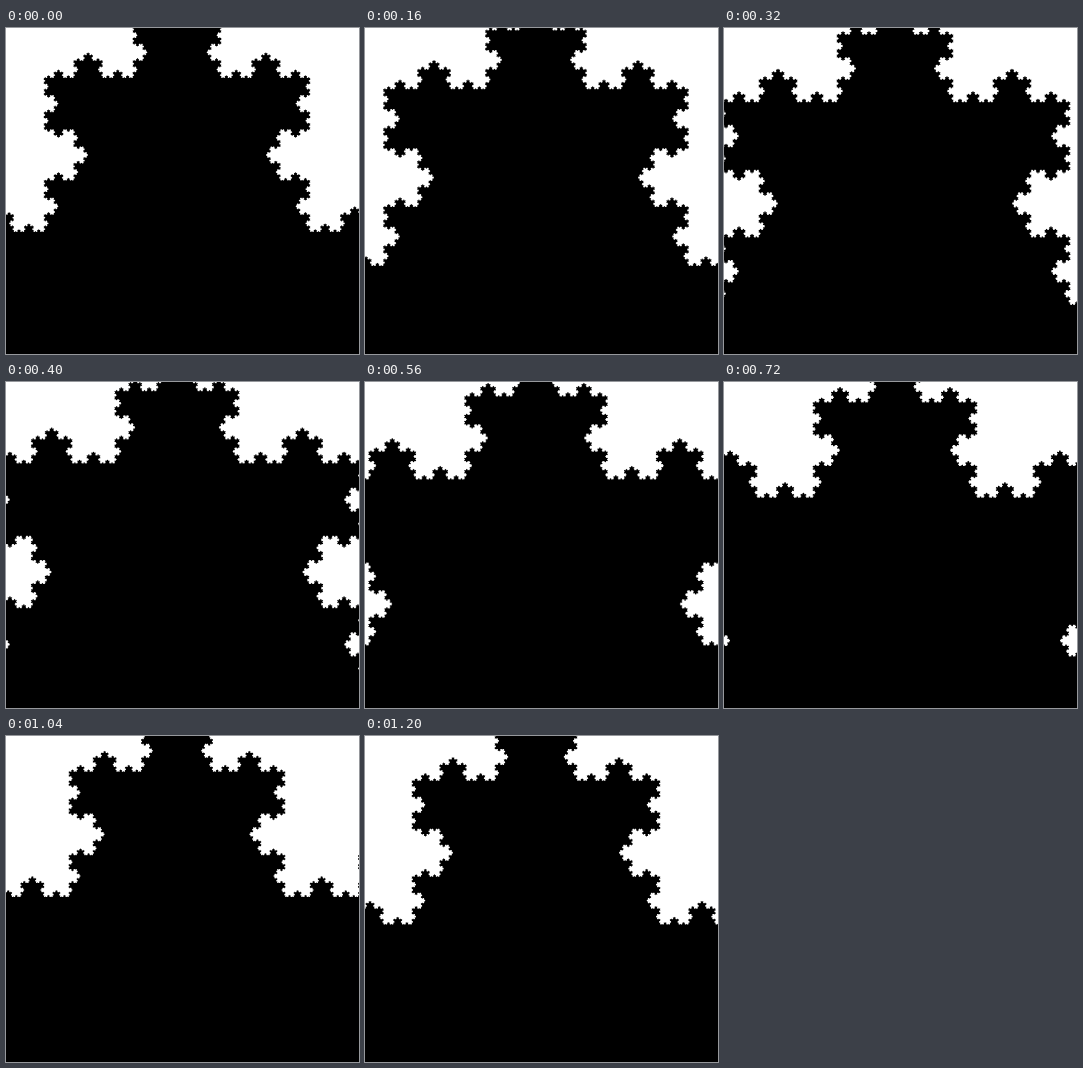
An HTML page with a canvas that plays this animation: 353x326 px, repeating every 1280 ms.

```html
<!DOCTYPE html>
<html>
<head>
<meta charset="utf-8">
<title>Koch curve zoom</title>
<style>
html, body { margin: 0; width: 100%; height: 100%; overflow: hidden; background: #fff; }
canvas { display: block; }
</style>
</head>
<body>
<canvas id="stage" width="353" height="326"></canvas>
<script>
const ctx = document.getElementById('stage').getContext('2d');
const STEPS = 16, STEP_MS = 80;
const TIP = { x: 171, y: -27 };   // fixed point of the zoom
const SIDE = 800, DEPTH = 7;

// Two Koch sides meeting in the tip at (0, 0), drawn turtle-style.
function snowflakeTip() {
  const path = new Path2D();
  const unit = SIDE / 3 ** DEPTH;
  let x = -SIDE / 2, y = SIDE * Math.sqrt(3) / 2;
  let dir = -1;                   // in units of 60 degrees

  function koch(depth) {
    if (depth === 0) {
      x += unit * Math.cos(dir * Math.PI / 3);
      y += unit * Math.sin(dir * Math.PI / 3);
      path.lineTo(x, y);
      return;
    }
    for (const turn of [-1, 2, -1, 0]) {
      koch(depth - 1);
      dir += turn;
    }
  }

  path.moveTo(x, y);
  koch(DEPTH);
  dir += 2;
  koch(DEPTH);
  path.closePath();
  return path;
}

const tip = snowflakeTip();
let shown = -1;

function draw(step) {
  const zoom = 3 ** (step / STEPS);
  ctx.setTransform(1, 0, 0, 1, 0, 0);
  ctx.fillStyle = '#fff';
  ctx.fillRect(0, 0, 353, 326);
  ctx.setTransform(zoom, 0, 0, zoom, TIP.x, TIP.y);
  ctx.fillStyle = '#000';
  ctx.fill(tip);
}

function tick() {
  const step = Math.floor(performance.now() / STEP_MS) % STEPS;
  if (step !== shown) draw(shown = step);
  requestAnimationFrame(tick);
}
tick();
</script>
</body>
</html>
```
